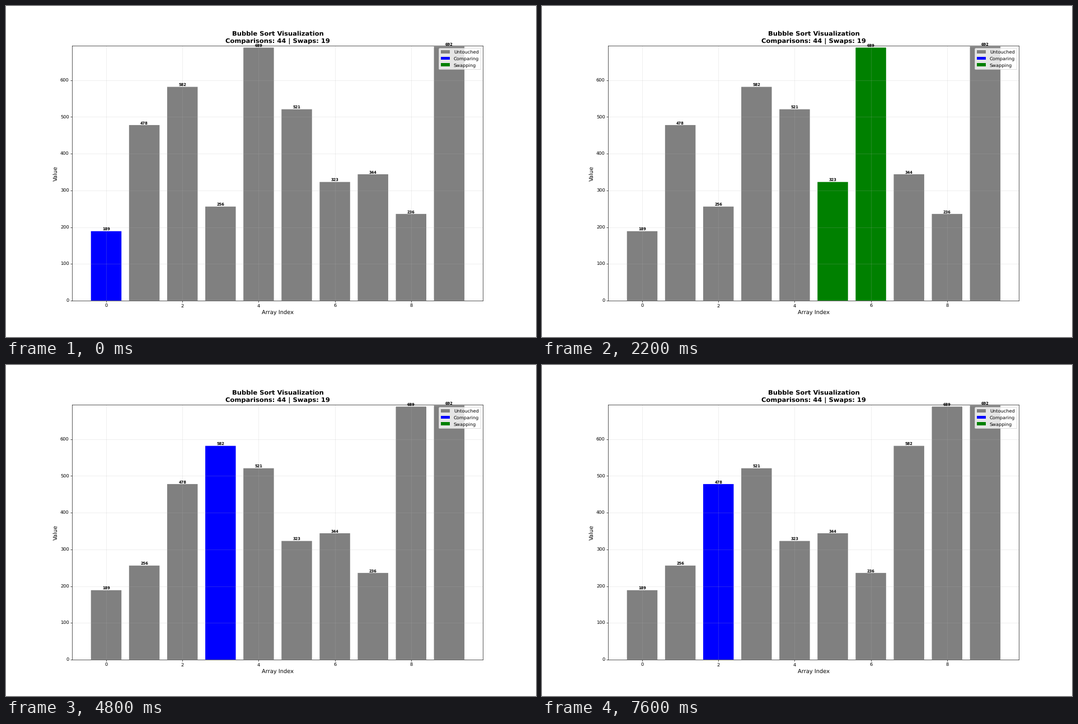
Recreate the animation shown at these times as a matplotlib script. Size 947 by 592 pixels, loop 8 s.

```python
import matplotlib.pyplot as plt
from matplotlib.animation import FuncAnimation
from matplotlib.patches import Patch

plt.rcParams["font.family"] = "DejaVu Sans"
plt.rcParams["text.hinting"] = "no_hinting"

START = [189, 478, 582, 256, 689, 521, 323, 344, 236, 692]
IDLE, COMPARE, SWAP = "gray", "blue", "green"
STEP_MS = 200
STEPS = 40


def bubble_steps(values):
    """Two steps per comparison: look at item j, then swap or hold."""
    a = list(values)
    steps = []
    for end in range(len(a) - 1, 0, -1):
        for j in range(end):
            look = (a[:], {j: COMPARE})
            steps.append(look)
            if a[j] > a[j + 1]:
                a[j], a[j + 1] = a[j + 1], a[j]
                steps.append((a[:], {j: SWAP, j + 1: SWAP}))
            else:
                steps.append(look)
    return steps


steps = bubble_steps(START)[:STEPS]

fig, ax = plt.subplots(figsize=(16, 10), dpi=59.2)
bars = ax.bar(range(len(START)), START, color=IDLE, linewidth=0, snap=False)
labels = [
    ax.text(i, v, str(v), ha="center", va="bottom", fontsize=8, fontweight="bold")
    for i, v in enumerate(START)
]

ax.set_ylim(0, 694.05)
ax.set_title(
    "Bubble Sort Visualization\nComparisons: 44 | Swaps: 19",
    fontsize=14,
    fontweight="bold",
    linespacing=1.3,
)
ax.set_xlabel("Array Index", fontsize=12)
ax.set_ylabel("Value", fontsize=12)
ax.grid(True, alpha=0.3)
key = {"Untouched": IDLE, "Comparing": COMPARE, "Swapping": SWAP}
ax.legend(
    handles=[
        Patch(facecolor=color, linewidth=0, snap=False, label=name)
        for name, color in key.items()
    ],
    loc="upper right",
)


def draw(n):
    values, marks = steps[n]
    for i, (bar, label, v) in enumerate(zip(bars, labels, values)):
        bar.set_height(v)
        bar.set_facecolor(marks.get(i, IDLE))
        label.set_y(v)
        label.set_text(str(v))
    return [*bars, *labels]


anim = FuncAnimation(
    fig,
    draw,
    frames=STEPS,
    init_func=lambda: draw(0),
    interval=STEP_MS,
    repeat=True,
    repeat_delay=0,
    blit=False,
)
plt.show()
```
